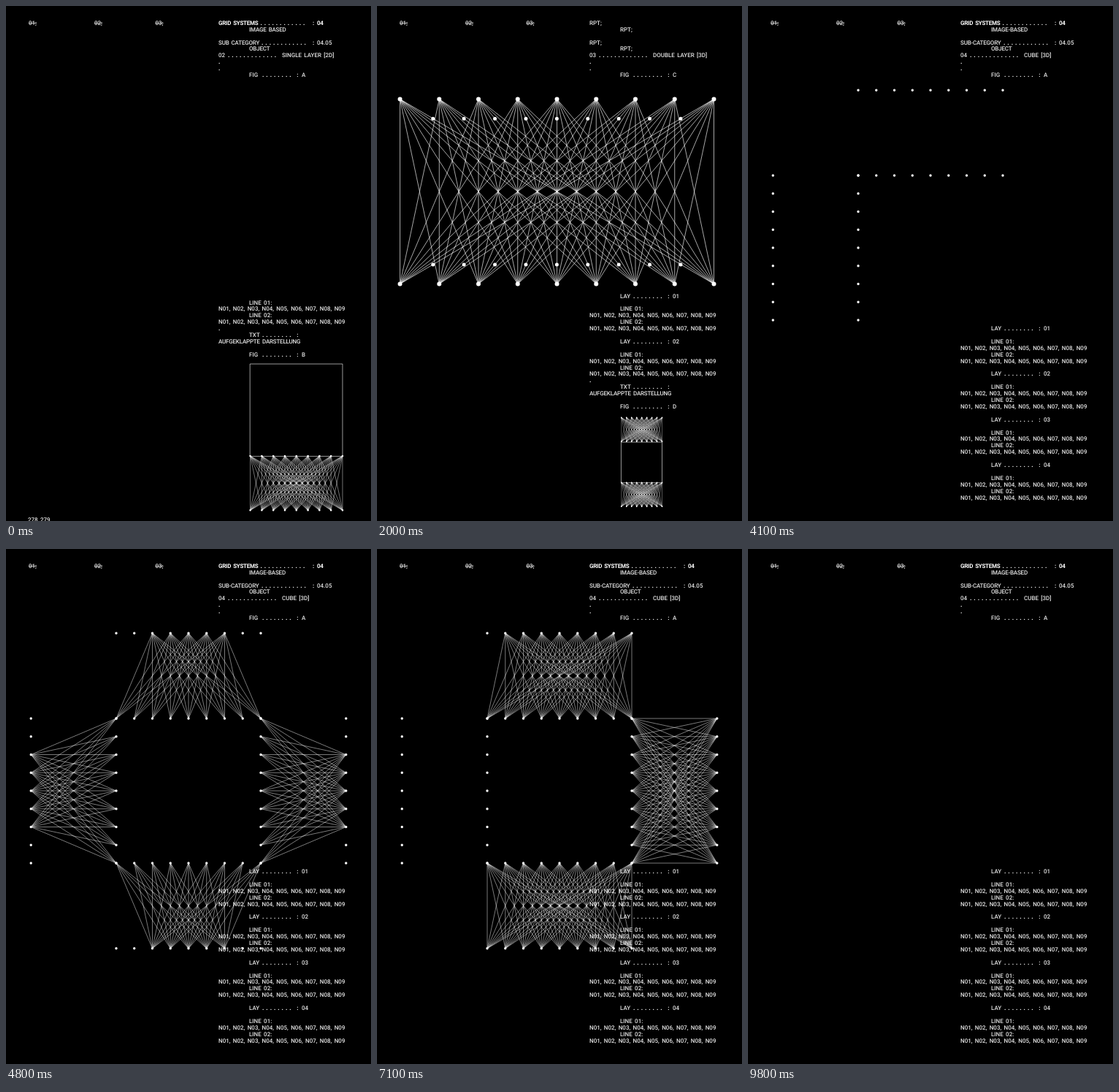
Recreate the animation shown at these times as an HTML page. Size 500 px wide and 705 px high, loop 9.9 s.

```html
<!DOCTYPE html>
<html lang="en">
<head>
<meta charset="utf-8">
<title>Grid systems</title>
<style>
  html, body { margin: 0; height: 100%; overflow: hidden; background: #000; }
  svg { display: block; width: 100%; height: 100%; }
  text { font: 500 8px Roboto, Arial, sans-serif; fill: #e4e4e4; word-spacing: 1.3px; white-space: pre; text-rendering: geometricPrecision; }
  .tight { letter-spacing: -.2px; }
  .bold { font-weight: 700; fill: #fff; letter-spacing: -.25px; }
  .struck { text-decoration: line-through; }
  path { fill: none; stroke: #fff; stroke-linecap: round; }
  .dots { font-weight: 900; fill: #fff; letter-spacing: 2.9px; }
</style>
</head>
<body>
<svg id="stage" viewBox="0 0 500 705"></svg>
<script>
const STEP = 100, STEPS = 99;
const stage = document.getElementById('stage');
const timed = [];

// Adds an element; with on/off it is visible only during those steps.
function add(parent, tag, attrs, on, off) {
  const el = document.createElementNS('http://www.w3.org/2000/svg', tag);
  for (const key in attrs) el.setAttribute(key, attrs[key]);
  if (off) timed.push({ el, on, off });
  return parent.appendChild(el);
}

// ---- Text ----
function write(page, row, x, str, cls = '') {
  add(page, 'text', { x, y: 25.8 + 8.9 * row, class: cls }).textContent = str;
}

function leader(page, row, x, count) {
  write(page, row, x, '.'.repeat(count), 'dots');
}

function entry(page, row, label, value = '') {
  write(page, row, 333, label);
  leader(page, row, 351, 8);
  write(page, row, 398.3, ':', 'bold');
  write(page, row, 405, value);
}

function lines(page, row) {
  const names = Array.from({ length: 9 }, (_, i) => 'N0' + (i + 1)).join(', ');
  for (const k of [0, 1]) {
    write(page, row + 2 * k, 333, `LINE 0${k + 1}:`);
    write(page, row + 2 * k + 1, 291, names);
  }
}

function layers(page, row, count) {
  for (let k = 0; k < count; k++) {
    entry(page, row + 7 * k, 'LAY', '0' + (k + 1));
    lines(page, row + 7 * k + 2);
  }
}

function title(page, sep) {
  write(page, 0, 291, 'GRID SYSTEMS', 'bold');
  leader(page, 0, 348.5, 12);
  write(page, 0, 420, ':', 'bold');
  write(page, 0, 426, '04', 'bold');
  write(page, 1, 333, `IMAGE${sep}BASED`, 'tight');
  write(page, 3, 291, `SUB${sep}CATEGORY`, 'tight');
  leader(page, 3, 350, 12);
  write(page, 3, 420, ':', 'bold');
  write(page, 3, 426, '04.05');
  write(page, 4, 333, 'OBJECT', 'tight');
}

function header(page, num, kind, fig) {
  write(page, 5, 291, num);
  leader(page, 5, 304, 13);
  write(page, 5, 378, kind);
  for (const row of [6, 7]) leader(page, row, 291, 1);
  entry(page, 8, 'FIG', fig);
}

function unfolded(page, row, fig) {
  leader(page, row, 291, 1);
  entry(page, row + 1, 'TXT');
  write(page, row + 2, 291, 'AUFGEKLAPPTE DARSTELLUNG', 'tight');
  entry(page, row + 4, 'FIG', fig);
}

// ---- Lattices: two rows of nine nodes, all joined across ----
const nine = fn => Array.from({ length: 9 }, (_, i) => fn(i));

function nodes(parent, { x, y, w, h, r }, on, off) {
  const d = nine(i => `M${x + w * i / 8} ${y}h0m0 ${h}h0`).join('');
  add(parent, 'path', { d, 'stroke-width': 2 * r }, on, off);
}

function fan(parent, { x, y, w, h, line, alpha }, i, on, off) {
  const d = nine(k => `M${x + w * i / 8} ${y}L${x + w * k / 8} ${y + h}`).join('');
  add(parent, 'path', { d, 'stroke-width': line, 'stroke-opacity': alpha }, on, off);
}

function lattice(parent, box) {
  nine(i => fan(parent, box, i));
  nodes(parent, box);
}

function square(parent, x, y, size) {
  add(parent, 'path', { d: `M${x} ${y}h${size}v${size}h${-size}z`, 'stroke-opacity': .6 });
}

// ---- Pages ----
['01;', '02;', '03;'].forEach((s, i) => write(stage, 0, [31, 121, 204.5][i], s, 'struck'));

const single = add(stage, 'g', {}, 0, 20);
title(single, ' ');
header(single, '02', 'SINGLE LAYER [2D]', 'A');
lines(single, 43);
unfolded(single, 47, 'B');
square(single, 334.6, 490, 126.4);
lattice(single, { x: 334.6, y: 616, w: 126.4, h: 74.3, r: 1.3, line: .75, alpha: .6 });
add(single, 'text', { x: 30, y: 705.8 }).textContent = '278 279';

const double = add(stage, 'g', {}, 20, 39);
[[0, 291], [1, 333], [3, 291], [4, 333]].forEach(([row, x]) => write(double, row, x, 'RPT;'));
header(double, '03', 'DOUBLE LAYER [3D]', 'C');
layers(double, 42, 2);
unfolded(double, 55, 'D');
square(double, 334.8, 597, 55.7);
for (const y of [563.5, 652.5]) {
  lattice(double, { x: 334.8, y, w: 55.7, h: 32.5, r: .9, line: .55, alpha: .6 });
}

const cube = add(stage, 'g', {}, 39, 99);
title(cube, '-');
header(cube, '04', 'CUBE [3D]', 'A');
layers(cube, 47, 4);

// ---- Large figures ----
const outer = { x: 31.5, y: 127.5, w: 430, h: 253, r: 3, line: 1, alpha: .65 };
const inner = { x: 76.7, y: 154.2, w: 339.3, h: 199.8, r: 2.5, line: 1, alpha: .65 };
nine(i => fan(stage, outer, i, 2 + i, 39));
nine(i => fan(stage, inner, i, 21 + i, 39));
nodes(stage, outer, 1, 39);
nodes(stage, inner, 20, 39);

// Cube sides run left, top, right, bottom: built from the middle, cleared clockwise.
const side = { x: 151, y: 115.2, w: 198, h: 116.8, r: 1.7, line: .9, alpha: .53 };
for (let s = 0; s < 4; s++) {
  const g = add(stage, 'g', { transform: `rotate(${90 * (s - 1)} 250 331)` });
  nine(i => {
    const rank = i < 4 ? 7 - 2 * i : 2 * i - 8;
    fan(g, side, i, 44 + rank, 62 + 9 * s + i);
  });
  nodes(g, side, 40 + s, 98);
}

function draw(now) {
  const step = Math.floor(now / STEP) % STEPS;
  for (const { el, on, off } of timed) {
    el.style.display = step >= on && step < off ? '' : 'none';
  }
}

function tick() {
  draw(performance.now());
  requestAnimationFrame(tick);
}
tick();
</script>
</body>
</html>
```
